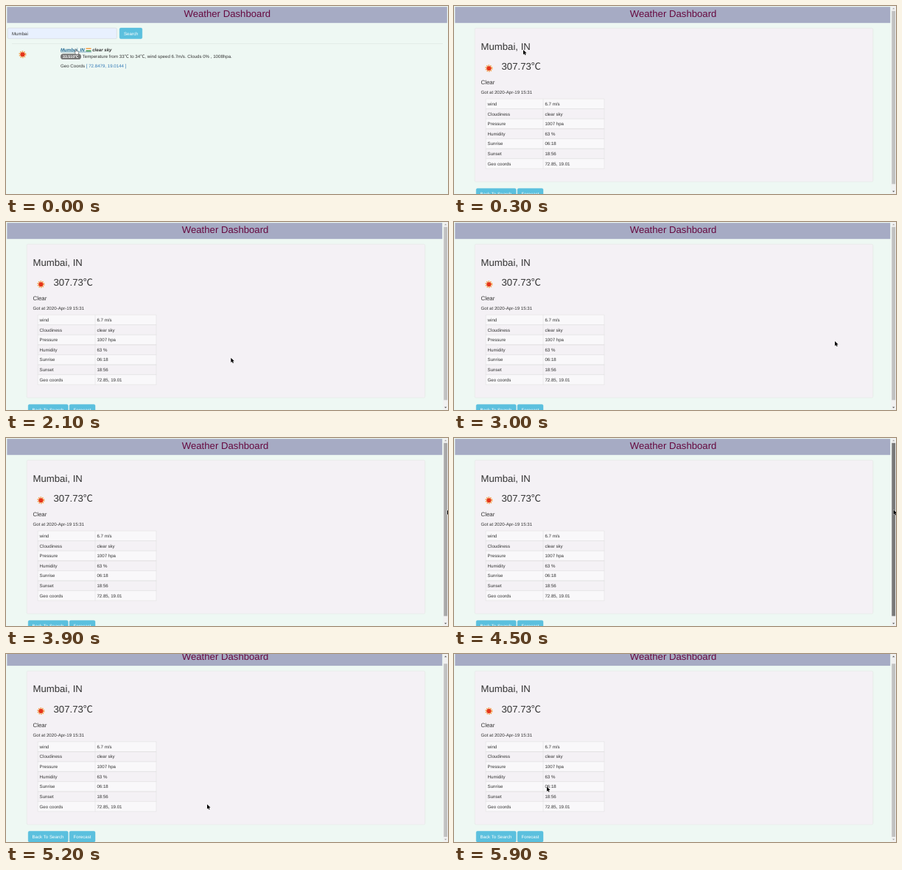
Recreate the animation shown at these times as an HTML page. Size 600x257 px, loop 6.3 s.

```html
<!DOCTYPE html>
<html lang="en">
<head>
<meta charset="utf-8">
<title>Weather Dashboard</title>
<style>
html, body { margin: 0; height: 100%; overflow: hidden; background: #eef8f3; }
svg { display: block; width: 100vw; height: 100vh; }
text {
  font: 6.15px "Liberation Sans", Arial, "Noto Sans CJK SC", sans-serif;
  fill: #333;
  text-rendering: geometricPrecision;
  white-space: pre;
}
.big { font-size: 13.18px; }
.mid { font-size: 7.9px; }
.title { font-size: 13.18px; fill: #660a40; text-anchor: middle; }
.strong { font-weight: bold; font-style: italic; }
.badge { font-size: 5.27px; font-weight: bold; fill: #fff; }
.white { fill: #fff; }
.link { fill: #337ab7; }
.btn { fill: #5bc0de; stroke: #46b8da; stroke-width: .44; }
.bar { fill: #a6abc4; }
</style>
</head>
<body>
<svg viewBox="0 0 600 257" preserveAspectRatio="none">
  <defs>
    <g id="sun">
      <circle r="3.7" fill="none" stroke="#f3a04a" stroke-width="2.6" stroke-dasharray="1.3 1.025"/>
      <circle r="3" fill="#e5341a"/>
    </g>
  </defs>

  <g id="search">
    <rect class="bar" x="1.4" y="1.2" width="597.4" height="22"/>
    <text class="title" x="300.3" y="15">Weather Dashboard</text>
    <rect x="2.2" y="30.1" width="148.2" height="14.6" rx="1.7" fill="#e8f0fe" stroke="#ccc" stroke-width=".44"/>
    <text x="8" y="39.7">Mumbai</text>
    <rect class="btn" x="154.2" y="30.1" width="30.6" height="14.6" rx="1.7"/>
    <text class="white" x="160" y="39.7">Search</text>
    <path d="M8 51.5H593" stroke="#dce5e0" stroke-width=".6"/>
    <use href="#sun" x="22.5" y="66.2"/>
    <text class="strong" x="74" y="62" style="fill:#1d6690">Mumbai, IN</text>
    <path d="M74 62.9H116" stroke="#1d6690" stroke-width=".6"/>
    <path d="M108.5 58.3h7" stroke="#f39a3d" stroke-width="1.5"/>
    <path d="M108.5 59.8h7" stroke="#fff" stroke-width="1.5"/>
    <path d="M108.5 61.3h7" stroke="#3d8f3d" stroke-width="1.5"/>
    <text class="strong" x="117.2" y="62">clear sky</text>
    <rect x="74" y="65.2" width="28" height="7.9" rx="3.95" fill="#777"/>
    <text class="badge" x="77" y="71">33.510℃</text>
    <text x="103.7" y="70.9">Temperature from 33℃ to 34℃, wind speed 6.7m/s. Clouds 0% , 1008hpa.</text>
    <text x="74" y="84">Geo Coords</text>
    <text class="link" x="108.8" y="84">[ 72.8479, 19.0144 ]</text>
    <path d="M94.2 59.2q.7-.8 1.3 0v2.3l2.6.6q.8.3.6 1.5l-.5 2.6h-3.3l-2-2.9q.3-.9 1.3 0z"
      fill="#fff" stroke="#222" stroke-width=".45"/>
  </g>

  <g id="detail">
    <g id="page">
      <rect class="bar" x="1.4" y="1.2" width="590.8" height="22"/>
      <text class="title" x="297.6" y="15">Weather Dashboard</text>
      <rect x="28.2" y="30.3" width="540.6" height="210" rx="1.7" fill="#f4f1f5" stroke="#e0e2e1" stroke-width=".5"/>
      <text class="big" x="36.5" y="59.6">Mumbai, IN</text>
      <use href="#sun" x="47.4" y="85.2"/>
      <text class="big" x="64.5" y="87.3">307.73℃</text>
      <text class="mid" x="36.5" y="107.3">Clear</text>
      <text x="36.5" y="120.1">Got at 2020-Apr-19 15:31</text>
      <g id="table"></g>
      <rect class="btn" x="30.2" y="249.4" width="54" height="14.6" rx="1.7"/>
      <text class="white" x="35.5" y="258.8">Back To Search</text>
      <rect class="btn" x="86.2" y="249.4" width="34.8" height="14.6" rx="1.7"/>
      <text class="white" x="91.6" y="258.8">Forecast</text>
    </g>
    <rect x="593.4" width="6.6" height="257" fill="#f1f1f1"/>
    <rect id="thumb" x="594.3" width="4.8" height="236.6"/>
    <path id="up" d="M595.1 4.2h3.2l-1.6-1.8z"/>
    <path id="down" d="M595.1 252.8h3.2l-1.6 1.8z"/>
    <path id="cursor" d="M0 0V6.4L1.5 5L2.5 7.3L3.6 6.8L2.6 4.6H4.6Z"
      fill="#000" stroke="#fff" stroke-width=".7" paint-order="stroke"/>
  </g>
</svg>
<script>
const $ = id => document.getElementById(id);
const LOOP = 6300, STEP = 100;

const rows = [
  ["wind", "6.7 m/s"], ["Cloudiness", "clear sky"], ["Pressure", "1007 hpa"],
  ["Humidity", "63 %"], ["Sunrise", "06:18"], ["Sunset", "18:56"], ["Geo coords", "72.85, 19.01"]
];
$("table").innerHTML = rows.map(([name, value], i) => {
  const y = 127 + i * 13.62;
  return `<path d="M43.2 ${y}h160.8v13.62h-160.8zM121 ${y}v13.62"
    fill="${i % 2 ? "none" : "#f9f8fa"}" stroke="#dcdcdc" stroke-width=".45"/>
    <text x="45.6" y="${y + 8.9}">${name}</text><text x="123.4" y="${y + 8.9}">${value}</text>`;
}).join("");

// Pointer path: time, x, y
const path = [
  [300, 94, 60], [600, 94, 60], [1000, 301, 120.5], [1400, 301, 120.5],
  [1600, 378, 155], [1800, 338, 196], [2000, 338, 196], [2300, 240, 165],
  [2700, 300, 172], [3000, 517, 163], [3400, 602, 125], [3800, 602, 99],
  [3900, 599, 98.5], [4000, 599, 98.5], [4300, 596.6, 97.5], [4600, 596.6, 98.5],
  [4700, 596.6, 107], [4800, 596.6, 111], [4900, 596.6, 111], [5200, 273, 205.5],
  [5300, 195, 195], [5400, 150, 189], [5500, 150, 189], [5900, 126, 181.5], [LOOP, 126, 181.5]
];

function pointer(t) {
  const i = Math.max(1, path.findIndex(p => p[0] > t));
  const [a, b] = [path[i - 1], path[i]];
  const k = (t - a[0]) / (b[0] - a[0]);
  return [1, 2].map(n => a[n] + (b[n] - a[n]) * k);
}

function draw(now) {
  const t = Math.floor(now % LOOP / STEP) * STEP;
  const detail = t >= 300;
  $("search").style.display = detail ? "none" : "";
  $("detail").style.display = detail ? "" : "none";
  if (detail) {
    const scroll = t < 4700 ? 0 : t < 4800 ? 5 : 7.1;
    $("page").setAttribute("transform", `translate(0 ${-scroll})`);
    $("thumb").setAttribute("y", 6.8 + scroll * .92);
    $("thumb").setAttribute("fill",
      t >= 4500 && t < 4900 ? "#787878" : t >= 3900 && t < 5000 ? "#a8a8a8" : "#c1c1c1");
    $("up").setAttribute("fill", scroll ? "#505050" : "#a3a3a3");
    $("down").setAttribute("fill", scroll > 6 ? "#a3a3a3" : "#505050");
    $("cursor").setAttribute("transform", `translate(${pointer(t)})`);
  }
}

const start = performance.now();
function tick() {
  draw(performance.now() - start);
  requestAnimationFrame(tick);
}
tick();
</script>
</body>
</html>
```
